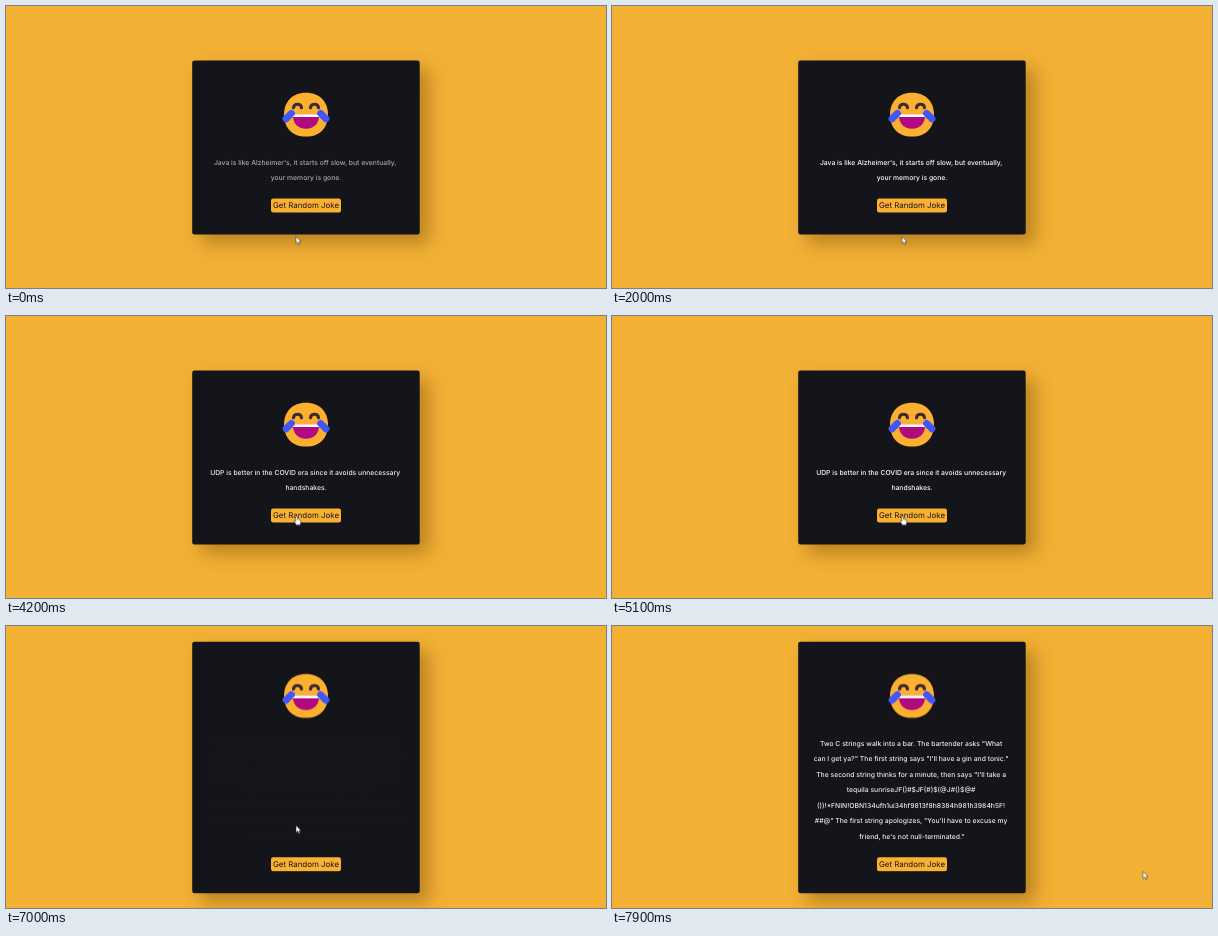
Recreate the animation shown at these times as an HTML page. Size 600 by 282 pixels, loop 8 s.

```html
<!DOCTYPE html>
<html lang="en">
<head>
<meta charset="utf-8">
<title>Random joke</title>
<style>
  html, body { margin: 0; width: 100%; height: 100%; overflow: hidden; background: #f2b035; }
  .stage { display: block; width: 600px; height: 282px; }
  .stage * { animation: 8s linear infinite; }

  text { font-family: Inter, "Open Sans", sans-serif; text-anchor: middle; text-rendering: geometricPrecision; }
  .card {
    x: 186.2px; y: 54.5px; width: 227.5px; height: 174px; rx: 2.2px; fill: #14151a;
    filter: drop-shadow(9px 9px 9px rgba(97, 63, 0, .4));
    animation-name: grow;
  }
  .joke { font-size: 6.8px; font-weight: 500; fill: #fff; opacity: 0; }
  .button rect { fill: #fab033; }
  .button text { font-size: 7.9px; fill: #14151a; }
  .cursor path { fill: #fff; stroke: #222; stroke-width: .5; stroke-linejoin: round; }

  .head { animation-name: rise; }
  .button { animation-name: sink; }
  .first { animation-name: first; }
  .second { animation-name: second; }
  .third { animation-name: third; }
  .cursor { animation-name: move; }
  .arrow { animation-name: arrow; }
  .hand { animation-name: hand; }

  @keyframes grow {
    0% { y: 54.5px; height: 174px; animation-timing-function: step-end; }
    87.1%, 100% { y: 15.8px; height: 251.4px; }
  }
  @keyframes rise {
    0% { transform: none; animation-timing-function: step-end; }
    87.1%, 100% { transform: translateY(-38.7px); }
  }
  @keyframes sink {
    0% { transform: none; animation-timing-function: step-end; }
    87.1%, 100% { transform: translateY(38.7px); }
  }
  @keyframes first {
    0% { opacity: .64; animation-timing-function: ease-out; }
    11.6% { opacity: 1; animation-timing-function: step-end; }
    33.125%, 100% { opacity: 0; }
  }
  @keyframes second {
    0%, 39.4% { opacity: 0; animation-timing-function: ease; }
    58.15% { opacity: 1; animation-timing-function: step-end; }
    80.625%, 100% { opacity: 0; }
  }
  @keyframes third {
    0%, 87.1% { opacity: 0; animation-timing-function: cubic-bezier(.33, .14, .45, .95); }
    100% { opacity: .95; }
  }
  @keyframes move {
    0%, 26.875% { transform: translate(290px, 230.5px); animation-timing-function: ease-in-out; }
    31.875%, 90.625% { transform: translate(290px, 199.5px); animation-timing-function: ease-in-out; }
    96.875%, 100% { transform: translate(531px, 245.5px); }
  }
  @keyframes arrow {
    0% { opacity: 1; animation-timing-function: step-end; }
    30.1% { opacity: 0; animation-timing-function: step-end; }
    87.1%, 100% { opacity: 1; }
  }
  @keyframes hand {
    0% { opacity: 0; animation-timing-function: step-end; }
    30.1% { opacity: 1; animation-timing-function: step-end; }
    87.1%, 100% { opacity: 0; }
  }
</style>
</head>
<body>
<svg class="stage" viewBox="0 0 600 282">
  <rect class="card"/>

  <g class="head">
    <g transform="translate(300 108.7)">
      <path fill="#fdb02f" d="M0 21.9C14.6 21.9 22 12.1 22 0S14.6-21.9 0-21.9-22-12.1-22 0-14.6 21.9 0 21.9Z"/>
      <path fill="none" stroke="#402a32" stroke-width="3.1" stroke-linecap="round"
            d="M-12.5-6.9C-12.1-11.7-4.9-11.7-4.5-6.9M4.5-6.9C4.9-11.7 12.1-11.7 12.5-6.9"/>
      <path fill="#b10a80" d="M-13.2-.4H13.2C13.2 8.8 8.2 14.1 0 14.1S-13.2 8.8-13.2-.4Z"/>
      <path fill="#fff" d="M-13.2-.4H13.2Q13.2 1 12.9 2.3H-12.9Q-13.2 1-13.2-.4Z"/>
      <path stroke="#4257fb" stroke-width="7" stroke-linecap="round" d="M-14.6-1.3L-19.9 4.1M14.6-1.3L19.9 4.1"/>
    </g>
  </g>

  <text class="joke first" y="158.6">
    <tspan x="300">Java is like Alzheimer's, it starts off slow, but eventually,</tspan>
    <tspan x="300" dy="15.5">your memory is gone.</tspan>
  </text>
  <text class="joke second" y="158.6">
    <tspan x="300">UDP is better in the COVID era since it avoids unnecessary</tspan>
    <tspan x="300" dy="15.5">handshakes.</tspan>
  </text>
  <text class="joke third" y="119.9">
    <tspan x="300">Two C strings walk into a bar. The bartender asks "What</tspan>
    <tspan x="300" dy="15.5">can I get ya?" The first string says "I'll have a gin and tonic."</tspan>
    <tspan x="300" dy="15.5">The second string thinks for a minute, then says "I'll take a</tspan>
    <tspan x="300" dy="15.5">tequila sunriseJF()#$JF(#)$(@J#()$@#</tspan>
    <tspan x="300" dy="15.5">())!*FNIN!OBN134ufh1ui34hf9813f8h8384h981h3984h5F!</tspan>
    <tspan x="300" dy="15.5">##@" The first string apologizes, "You'll have to excuse my</tspan>
    <tspan x="300" dy="15.5">friend, he's not null-terminated."</tspan>
  </text>

  <g class="button">
    <rect x="265" y="192.5" width="70" height="14" rx="2.2"/>
    <text x="300" y="202.3">Get Random Joke</text>
  </g>

  <g class="cursor">
    <path class="arrow" d="M0 0V7.2L1.7 5.6 2.8 8.2 4 7.7 2.9 5.2H5.2Z"/>
    <path class="hand" d="M-.2 1.1A.8.8 0 0 1 1.4 1.1V3.7L4 4.3Q5 4.6 4.9 5.7L4.3 9.4H.4L-1.8 6.1Q-2.1 5.1-1.2 5.1L-.2 5.8Z"/>
  </g>
</svg>
</body>
</html>
```
